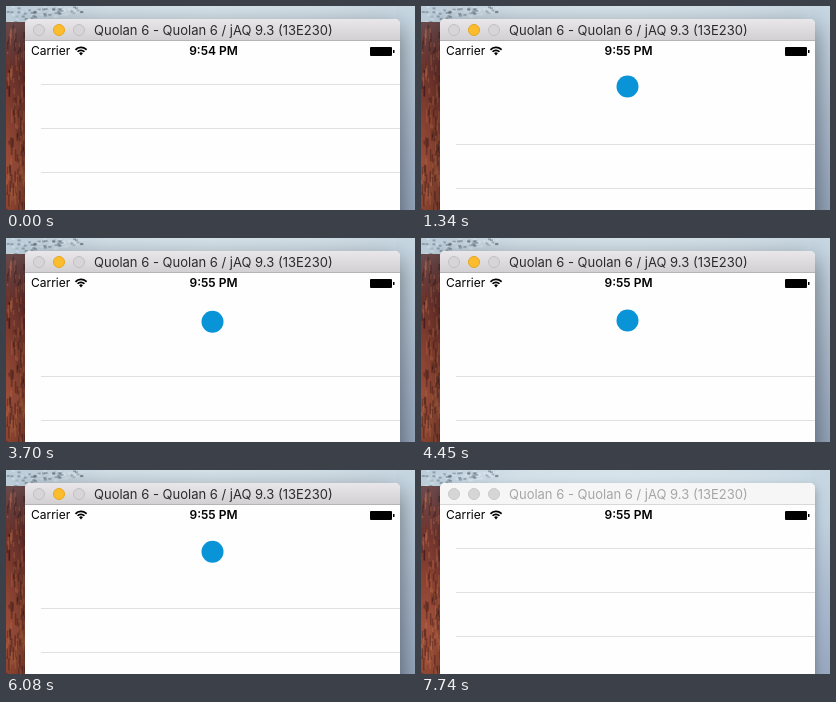
An HTML page with a canvas that plays this animation: 409x204 px, repeating every 7840 ms.

```html
<!DOCTYPE html>
<html lang="en">
<head>
<meta charset="utf-8">
<title>Pull to refresh</title>
<style>
html, body { margin: 0; width: 100%; height: 100%; overflow: hidden; }
canvas { display: block; width: 409px; height: 204px; }
</style>
</head>
<body>
<canvas id="stage"></canvas>
<script>
const W = 409, H = 204, LOOP = 7840, STEP = 148.2, BLUR_AT = 7740;
const WIN = { left: 19, right: 394, top: 13, bar: 35 };
const TITLE = 'Quolan 6 - Quolan 6 / jAQ 9.3 (13E230)';
const canvas = document.getElementById('stage');
const ctx = canvas.getContext('2d');
const ratio = window.devicePixelRatio || 1;
canvas.width = W * ratio;
canvas.height = H * ratio;
ctx.scale(ratio, ratio);

// Eased progress from a to b
function ease(t, a, b) {
  const p = Math.min(1, Math.max(0, (t - a) / (b - a)));
  return p * p * (3 - 2 * p);
}

function seededRandom(seed) {
  return () => (seed = seed * 16807 % 2147483647) / 2147483647;
}

function gradient(x1, y1, x2, y2, colours) {
  const g = ctx.createLinearGradient(x1, y1, x2, y2);
  colours.forEach((c, i) => g.addColorStop(i / (colours.length - 1), c));
  return g;
}

function rect(x, y, w, h, fill) {
  ctx.fillStyle = fill;
  ctx.fillRect(x, y, w, h);
}

function disc(x, y, r, fill, stroke) {
  ctx.beginPath();
  ctx.arc(x, y, r, 0, Math.PI * 2);
  ctx.fillStyle = fill;
  ctx.fill();
  if (!stroke) return;
  ctx.lineWidth = 1;
  ctx.strokeStyle = stroke;
  ctx.stroke();
}

function text(str, x, y, font, fill, align = 'left') {
  ctx.font = font + ' Inter, sans-serif';
  ctx.textAlign = align;
  ctx.fillStyle = fill;
  ctx.fillText(str, x, y);
}

function drawDesktop() {
  rect(0, 0, W, H, gradient(0, 0, W, 0, ['#bccdda', '#d3e0e8', '#d6e3ea', '#d3e0e8', '#c8d8e3']));
  rect(WIN.right - 4, 0, 19, H, gradient(0, 0, 0, H, ['#c8d8e3', '#bfd0de', '#b0c0d2', '#a3b3c9', '#97a8be']));
  const random = seededRandom(7);
  // Snowy trees along the top left
  for (let i = 0; i < 90; i++) {
    const x = random() * 75;
    rect(x, random() * (20 - x / 5), 3, 2, i % 2 ? 'rgba(70,88,105,.4)' : 'rgba(225,235,242,.4)');
  }
  // Streaked rock face
  rect(0, 16, 22, H - 16, gradient(0, 16, 0, H, ['#6b4a4c', '#70352f', '#8c4232', '#a0503a', '#8f4632']));
  for (let i = 0; i < 150; i++) {
    rect(random() * 21, 18 + random() * 186, 1.5, 4 + random() * 10,
      i % 2 ? 'rgba(45,16,20,.38)' : 'rgba(215,125,85,.3)');
  }
}

function drawWindow(active) {
  const width = WIN.right - WIN.left;
  ctx.save();
  ctx.shadowColor = active ? 'rgba(0,0,0,.5)' : 'rgba(0,0,0,.3)';
  ctx.shadowBlur = (active ? 26 : 10) * ratio;
  ctx.shadowOffsetY = (active ? 9 : 4) * ratio;
  ctx.beginPath();
  ctx.roundRect(WIN.left, WIN.top, width, 260, 5);
  ctx.fillStyle = '#fefefe';
  ctx.fill();
  ctx.restore();

  ctx.save();
  ctx.beginPath();
  ctx.roundRect(WIN.left, WIN.top, width, WIN.bar - WIN.top, [5, 5, 0, 0]);
  ctx.clip();
  rect(WIN.left, WIN.top, width, 22, active ? gradient(0, 13, 0, 35, ['#e9e7e9', '#d1cfd1']) : '#f6f6f6');
  rect(WIN.left, WIN.bar - 1, width, 1, active ? '#b5b3b5' : '#d8d8d8');
  ctx.restore();

  const idle = active ? ['#d7d5d7', '#c2c0c2'] : ['#d6d6d6', '#cbcbcb'];
  [33, 53, 73].forEach((x, i) => {
    const [fill, stroke] = active && i === 1 ? ['#fdbc2e', '#e6a623'] : idle;
    disc(x, 24, 5.5, fill, stroke);
  });
  text(TITLE, 88, 29, '13px', active ? '#2c2b2c' : '#a6a6a6');
}

function drawStatus(clock) {
  text('Carrier', 25, 49, '12px', '#000');
  text(clock, 207.5, 49, '600 12px', '#000', 'center');
  ctx.strokeStyle = '#000';
  ctx.lineWidth = 1.7;
  [7.6, 4.7].forEach(r => {
    ctx.beginPath();
    ctx.arc(75, 49, r, -Math.PI * .76, -Math.PI * .24);
    ctx.stroke();
  });
  ctx.beginPath();
  ctx.moveTo(75, 49.5);
  ctx.arc(75, 49, 2.6, -Math.PI * .76, -Math.PI * .24);
  ctx.fillStyle = '#000';
  ctx.fill();
  ctx.beginPath();
  ctx.roundRect(364, 41, 22, 9, 1);
  ctx.fill();
  rect(387, 44, 1.5, 3, '#000');
}

function drawTable(t) {
  const pull = 78 * ease(t, 60, 840) - 18 * ease(t, 860, 1180) - 60 * ease(t, 6635, 6935);
  const offset = Math.round(pull);
  // The bouncing badge is uncovered as the rows slide down
  ctx.save();
  ctx.beginPath();
  ctx.rect(WIN.left, WIN.bar, WIN.right - WIN.left, offset);
  ctx.clip();
  disc(206.5, 81 + 2.9 * Math.cos((t - 312) / 800 * Math.PI * 2), 11, '#0a94d8');
  ctx.restore();
  for (let y = 78 + offset; y < H; y += 44) rect(35, y, WIN.right - 35, 1, '#e0e0e2');
}

function draw(now) {
  const time = now % LOOP;
  const t = Math.floor(time / STEP) * STEP;
  ctx.clearRect(0, 0, W, H);
  drawDesktop();
  drawWindow(time < BLUR_AT);
  drawTable(t);
  drawStatus(t < 590 ? '9:54 PM' : '9:55 PM');
}

const start = performance.now();
function frame() {
  draw(performance.now() - start);
  requestAnimationFrame(frame);
}
frame();
</script>
</body>
</html>
```
